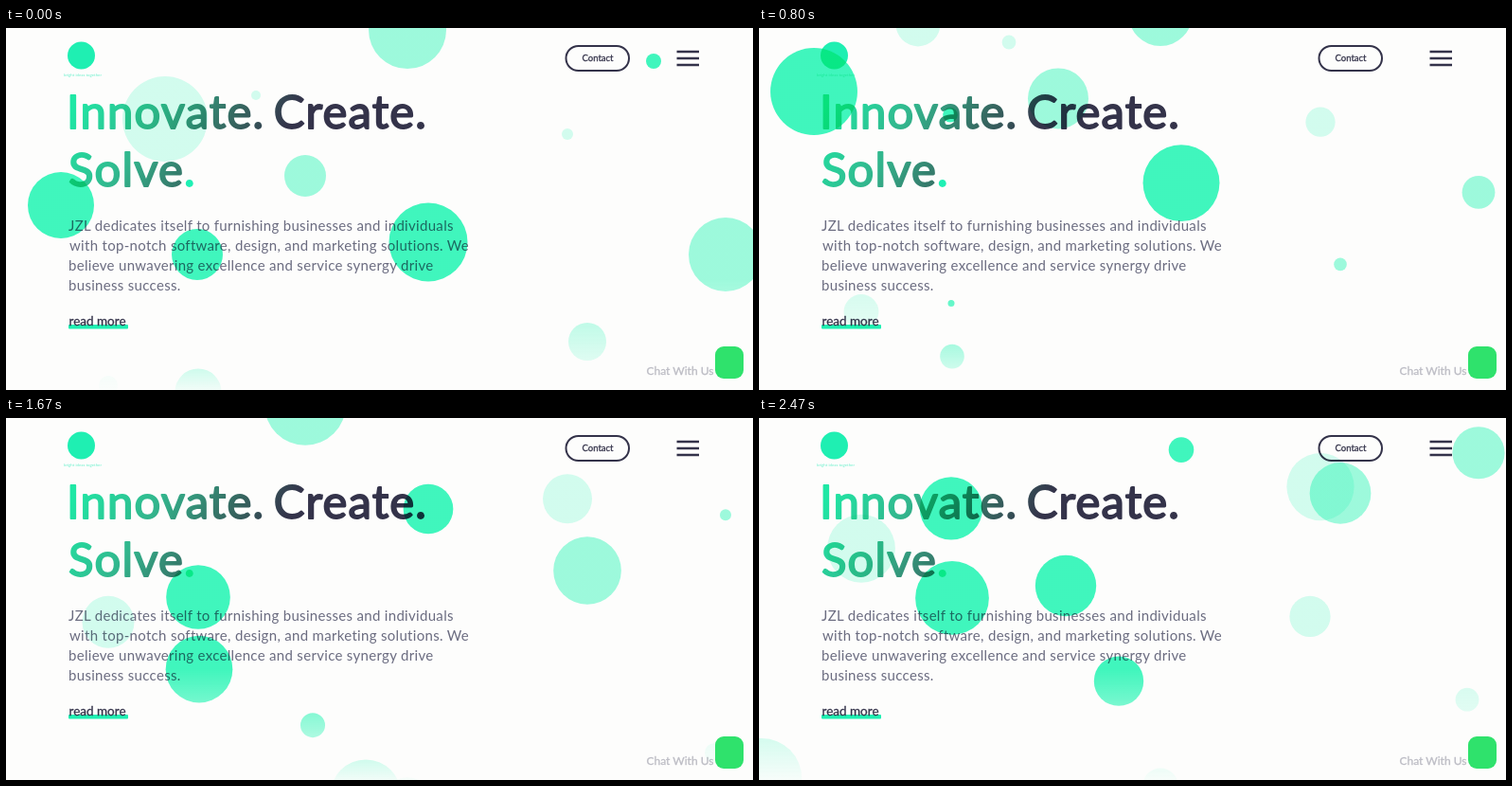
Recreate the animation shown at these times as an HTML page with a canvas. Size 789x382 px, loop 2.53 s.

```html
<!DOCTYPE html>
<html lang="en">
<head>
<meta charset="utf-8">
<title>Innovate. Create. Solve.</title>
<style>
  html, body { margin: 0; width: 100%; height: 100%; overflow: hidden; background: #fdfdfc; }
  .stage { position: relative; width: 789px; height: 382px; overflow: hidden; isolation: isolate; }
  .stage > * { position: absolute; left: 0; top: 0; display: block; }
  canvas { mix-blend-mode: multiply; }
  text { font-family: Lato, "Open Sans", sans-serif; white-space: pre; }
  .head { font-size: 49px; letter-spacing: 1.15px; word-spacing: -4px; fill: url(#ink); stroke: url(#ink); stroke-width: 1.8; stroke-linejoin: round; }
  .head .dot { fill: #1ff0b4; stroke: #1ff0b4; }
  .copy { font-size: 15px; letter-spacing: .31px; fill: #6b6c80; }
  .more { font-size: 13.5px; fill: #34334a; stroke: #34334a; stroke-width: .3; }
  .btn { font-size: 9.5px; fill: #34334a; stroke: #34334a; stroke-width: .3; text-anchor: middle; }
  .tag { font-size: 4.4px; fill: #6cf0cc; text-anchor: middle; }
  .chat { font-size: 12px; fill: #bcbcc4; stroke: #bcbcc4; stroke-width: .3; }
  .line { fill: none; stroke: #34334a; stroke-width: 2; }
  .menu { stroke-width: 2.6; }
  .badge { left: 749px; top: 336px; width: 30px; height: 34px; border-radius: 9px; background: #2fe26c; }
</style>
</head>
<body>
<div class="stage">
  <svg width="789" height="382" viewBox="0 0 789 382">
    <defs>
      <linearGradient id="ink" gradientUnits="userSpaceOnUse" x1="67" y1="88" x2="243" y2="194">
        <stop offset="0" stop-color="#1fe8a5"/>
        <stop offset=".4" stop-color="#33b48c"/>
        <stop offset=".75" stop-color="#36655f"/>
        <stop offset="1" stop-color="#34334a"/>
      </linearGradient>
    </defs>
    <rect width="789" height="382" fill="#fdfdfc"/>
    <circle cx="79.5" cy="29" r="14.5" fill="#1fefb2"/>
    <text class="tag" x="81" y="50.5">bright ideas together</text>

    <rect class="line" x="591.5" y="19" width="66.5" height="26" rx="13"/>
    <text class="btn" x="625" y="35">Contact</text>
    <path class="line menu" d="M708.5 25h23.5M708.5 32h23.5M708.5 39h23.5"/>

    <text class="head" x="64" y="106">Innovate. Create.</text>
    <text class="head" x="66" y="167">Solve<tspan class="dot">.</tspan></text>

    <g class="copy">
      <text x="66" y="214">JZL dedicates itself to furnishing businesses and individuals</text>
      <text x="67" y="235">with top-notch software, design, and marketing solutions. We</text>
      <text x="66" y="256">believe unwavering excellence and service synergy drive</text>
      <text x="66" y="277">business success.</text>
    </g>

    <rect x="66" y="313" width="63" height="4.6" rx="1" fill="#1fefb2"/>
    <text class="more" x="66.5" y="314">read more</text>
    <text class="chat" x="676.5" y="365.5">Chat With Us</text>
  </svg>
  <canvas width="789" height="382"></canvas>
  <div class="badge"></div>
</div>
<script>
const W = 789, H = 382, LOOP = 2530, FPS = 15, MAX_R = 47.5;
const ctx = document.querySelector('canvas').getContext('2d');

// One green for every bubble, fading out towards the bottom edge
const paint = ctx.createLinearGradient(0, 265, 0, 390);
paint.addColorStop(0, 'rgba(0,245,170,1)');
paint.addColorStop(1, 'rgba(0,245,170,0)');

// A bubble rises steadily while its radius swings between 0 and MAX_R.
// Once above the stage it comes back from below at nextX. Speeds in px/s.
function bubble(alpha, x, y, rise, r, grow, nextX = x) {
  const top = t => y - rise * t;
  const radius = t => {
    const swing = Math.abs(r + grow * t);
    return Math.min(swing, Math.abs(2 * MAX_R - swing));
  };
  let exit = 0;
  while (top(exit) > -radius(exit)) exit += .005;
  const jump = H + 2 * radius(exit);

  return t => {
    const again = t >= exit;
    ctx.globalAlpha = alpha;
    ctx.beginPath();
    ctx.arc(again ? nextX : x, top(t) + (again ? jump : 0), radius(t), 0, 2 * Math.PI);
    ctx.fill();
  };
}

const faint = bubble.bind(null, .17), soft = bubble.bind(null, .38), strong = bubble.bind(null, .75);
const bubbles = [
  faint(168, 96, 125, 45, -27, 582),
  faint(264, 71, 70, 5, 3, 748),
  faint(593, 112, 16, 6, 12),
  faint(108, 377, 97, 10, 10.5),
  soft(316, 156, 102, 22, 12.5, 3),
  soft(424, 2, 21, 41, -9),
  soft(614, 331, 102, 20, -33.5),
  soft(760, 239, 82, 39, -27),
  strong(58, 187, 150, 35, 13.7, 380),
  strong(446, 226, 78, 41.5, 16.3),
  strong(684, 35, 94, 8, -26, 204),
  strong(202, 239, 184, 27, -24, 324),
  strong(203, 384, 117, 24.5, -35)
];

function draw() {
  const t = Math.floor((performance.now() % LOOP) * FPS / 1000) / FPS;
  ctx.clearRect(0, 0, W, H);
  ctx.fillStyle = paint;
  for (const show of bubbles) show(t);
  requestAnimationFrame(draw);
}
draw();
</script>
</body>
</html>
```
